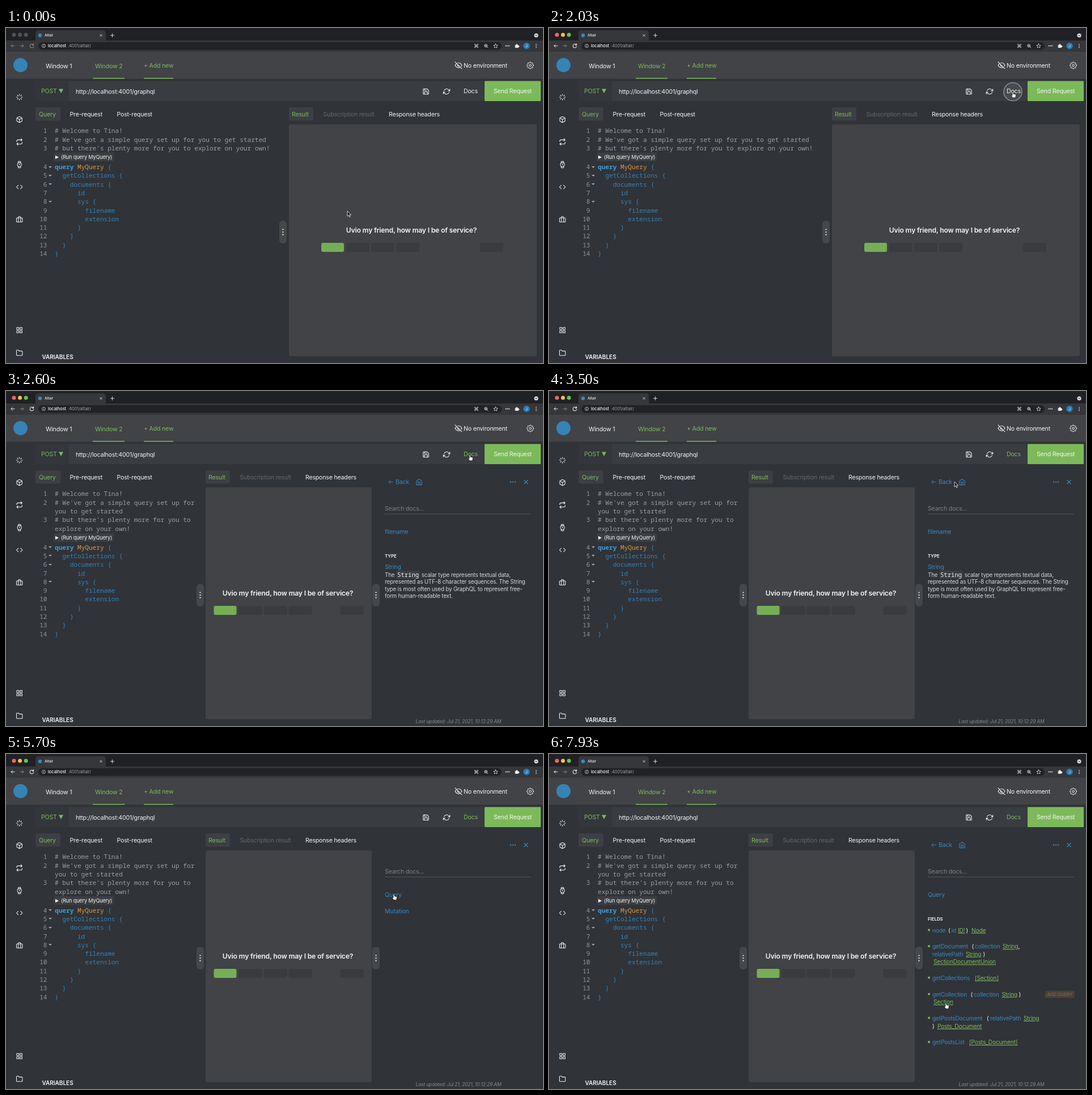
An HTML page for the animation above (8 s loop, 947 px wide and 591 px high).

```html
<!DOCTYPE html>
<html lang="en">
<head>
<meta charset="utf-8">
<title>GraphQL docs panel</title>
<style>
html, body { margin: 0; width: 100%; height: 100%; overflow: hidden; background: #303338; }
#stage { position: relative; width: 947px; height: 591px; overflow: hidden; }
svg { position: absolute; left: 0; top: 0; }
svg text { font-family: Inter, "Open Sans", sans-serif; white-space: pre; }
#editor { position: absolute; left: 86px; top: 173.4px; color: #3482b5;
  font: 11.1px/15.3px "Noto Sans Mono", "DejaVu Sans Mono", monospace; font-variant-ligatures: none; }
#editor .line { position: relative; white-space: pre-wrap; }
#editor .num { position: absolute; right: calc(100% + 13.5px); color: #92959a; }
#editor .fold::before { content: ""; position: absolute; left: -11px; top: 6.5px;
  border: 3px solid transparent; border-top: 3.5px solid #a3a6a9; }
#editor .note { color: #9b9ea1; }
#editor b { color: #459bd0; }
#editor i { color: #dc9647; font-style: normal; font-weight: 500; }
#editor .run { height: 17.8px; white-space: nowrap; }
#editor .run span { display: inline-block; height: 15px; margin: 1px 0 0 -2px; padding: 0 3px; border-radius: 2px;
  background: #3b3e42; color: #f0f0f0; font: 9.2px/15px Inter, sans-serif; letter-spacing: -.2px; }
#editor .run span::before { content: ""; display: inline-block; margin-right: 4px;
  border: 3.3px solid transparent; border-left: 6.5px solid #fff; border-right: 0; }
#desc { position: absolute; top: 318px; color: #d5d7d9; font: 9.9px/12.3px Inter, sans-serif; letter-spacing: -.2px; }
#desc code { font: 500 10.6px/12px "Noto Sans Mono", "DejaVu Sans Mono", monospace; letter-spacing: 0;
  padding: 0 2px; background: #3b3e42; color: #f0f0f0; border-radius: 2px; }
</style>
</head>
<body>
<div id="stage">
  <svg id="base" width="947" height="591"></svg>
  <div id="editor"></div>
  <div id="desc">The <code>String</code> scalar type represents textual data, represented as UTF-8 character sequences. The String type is most often used by GraphQL to represent free-form human-readable text.</div>
  <svg id="top" width="947" height="591"></svg>
</div>
<script>
const LOOP = 8000;
const GREEN = '#7cba59', BLUE = '#3688c0', WHITE = '#f3f4f5', BG = '#303338', LIGHT = '#414347';
const $ = id => document.getElementById(id);
const clamp = v => Math.max(0, Math.min(1, v));
const lerp = (a, b, p) => a + (b - a) * p;
const ramp = (t, from, to) => clamp((t - from) / (to - from));
const smooth = p => p * p * (3 - 2 * p);

function el(parent, tag, attrs = {}) {
  const node = document.createElementNS('http://www.w3.org/2000/svg', tag);
  for (const key in attrs) node.setAttribute(key, attrs[key]);
  return parent.appendChild(node);
}
const group = parent => el(parent, 'g');
const rect = (parent, x, y, width, height, fill, rx = 0) => el(parent, 'rect', { x, y, width, height, fill, rx });
const dot = (parent, cx, cy, r, fill) => el(parent, 'circle', { cx, cy, r, fill });
const stroke = (parent, d, color, width = 1) => el(parent, 'path', {
  d, fill: 'none', stroke: color, 'stroke-width': width, 'stroke-linecap': 'round', 'stroke-linejoin': 'round' });

// y is the middle of the capitals
function text(parent, x, y, str, fill = WHITE, size = 10.6, more = {}) {
  const node = el(parent, 'text', { x, y: y + size * .36, fill, 'font-size': size, 'letter-spacing': -.2, ...more });
  node.textContent = str;
  return node;
}
const shift = (node, x, y = 0) => node.setAttribute('transform', `translate(${x} ${y})`);
const show = (node, on) => node.style.display = on ? '' : 'none';

const ICONS = {
  loader: 'M12 2v4M12 18v4M4.9 4.9l2.9 2.9M16.2 16.2l2.9 2.9M2 12h4M18 12h4M4.9 19.1l2.9-2.9M16.2 7.8l2.9-2.9',
  box: 'M21 16V8a2 2 0 0 0-1-1.7l-7-4a2 2 0 0 0-2 0l-7 4A2 2 0 0 0 3 8v8a2 2 0 0 0 1 1.7l7 4a2 2 0 0 0 2 0l7-4A2 2 0 0 0 21 16zM3.3 7 12 12l8.7-5M12 22V12',
  repeat: 'M17 1l4 4-4 4M3 11V9a4 4 0 0 1 4-4h14M7 23l-4-4 4-4M21 13v2a4 4 0 0 1-4 4H3',
  watch: 'M19 12a7 7 0 1 0-14 0 7 7 0 1 0 14 0M12 9v3l1.5 1.5M16.5 17.3l-.4 3.8a2 2 0 0 1-2 1.9H9.8a2 2 0 0 1-2-1.9l-.3-3.8M7.5 6.7l.3-3.8A2 2 0 0 1 9.8 1h4.3a2 2 0 0 1 2 1.9l.4 3.8',
  code: 'M16 18l6-6-6-6M8 6l-6 6 6 6',
  bag: 'M4 7h16a2 2 0 0 1 2 2v10a2 2 0 0 1-2 2H4a2 2 0 0 1-2-2V9a2 2 0 0 1 2-2zM16 21V5a2 2 0 0 0-2-2h-4a2 2 0 0 0-2 2v16',
  grid: 'M3 3h7v7H3zM14 3h7v7h-7zM14 14h7v7h-7zM3 14h7v7H3z',
  folder: 'M22 19a2 2 0 0 1-2 2H4a2 2 0 0 1-2-2V5a2 2 0 0 1 2-2h5l2 3h9a2 2 0 0 1 2 2z',
  save: 'M19 21H5a2 2 0 0 1-2-2V5a2 2 0 0 1 2-2h11l5 5v11a2 2 0 0 1-2 2zM17 21v-8H7v8M7 3v5h8',
  refresh: 'M23 4v6h-6M1 20v-6h6M3.5 9a9 9 0 0 1 14.9-3.4L23 10M1 14l4.6 4.4A9 9 0 0 0 20.5 15',
  hidden: 'M17.9 17.9A10 10 0 0 1 12 20c-7 0-11-8-11-8a18.5 18.5 0 0 1 5-5.9M9.9 4.2A9 9 0 0 1 12 4c7 0 11 8 11 8a18.5 18.5 0 0 1-2.2 3.2M14.1 14.1a3 3 0 1 1-4.2-4.2M1 1l22 22',
  back: 'M20 12H4M11 19l-7-7 7-7',
  home: 'M3 9l9-7 9 7v11a2 2 0 0 1-2 2H5a2 2 0 0 1-2-2zM9 22V12h6v10',
  close: 'M18 6 6 18M6 6l12 12',
  zoom: 'M18 11a7 7 0 1 0-14 0 7 7 0 1 0 14 0M16 16l6 6M8 11h6M11 8v6',
  star: 'M12 2l3 7 7 .6-5.300 4.700 1.700 7.200L12 17.500 5.600 21.500l1.700-7.200L2 9.600 9 9z',
  cmd: 'M9 9h6v6H9zM9 9V6a3 3 0 1 0-3 3zM15 9V6a3 3 0 1 1 3 3zM15 15v3a3 3 0 1 0 3-3zM9 15v3a3 3 0 1 1-3-3z',
  puzzle: 'M4 8h5a3 3 0 1 1 5 0h5v5a3 3 0 1 1 0 4v4H4z'
};
function icon(parent, name, x, y, color = WHITE, size = 12.5, width = 2) {
  const k = size / 24;
  const node = stroke(parent, ICONS[name], color, width);
  node.setAttribute('transform', `translate(${x - size / 2} ${y - size / 2}) scale(${k})`);
  return node;
}
function gear(parent, x, y) {
  let d = '';
  for (let i = 0; i < 32; i++) {
    const r = i % 4 < 2 ? 6 : 4.7, a = (i - .5) * Math.PI / 16;
    d += (i ? 'L' : 'M') + (x + r * Math.cos(a)).toFixed(2) + ' ' + (y + r * Math.sin(a)).toFixed(2);
  }
  stroke(parent, d + 'z', WHITE);
  el(parent, 'circle', { cx: x, cy: y, r: 1.9, fill: 'none', stroke: WHITE });
}

const base = $('base'), top_ = $('top');

// browser frame
rect(base, 0, 0, 947, 591, BG);
rect(base, 0, 0, 947, 23, '#202124');
rect(base, 0, 22, 947, 20, '#35373a');
rect(base, 52, 4, 124, 22, '#35373a', 5);
rect(base, 57, 25, 817, 13.5, '#202225', 6.7);
const lights = ['#ed6a5e', '#f5bf4f', '#61c555'].map((color, i) => ({ color, node: dot(base, 14 + i * 10.6, 12, 3.5, color) }));
dot(base, 60, 13, 3.3, '#3d86b5');
text(base, 68, 13, 'Altair', '#e4e5e6', 6.4, { 'font-weight': 500 });
icon(base, 'close', 167.5, 13, '#dddddd', 7, 3);
stroke(base, 'M184.500 13h6M187.500 10v6', '#d8d9da');
dot(base, 935, 13, 3.6, '#d8d9da');
stroke(base, 'M933.500 12.500l1.500 1.500 1.500-1.500', '#202124', .9);
const backArrow = icon(base, 'back', 12, 31.5, '#e4e5e6', 9, 2.6);
el(icon(base, 'back', 0, 0, '#85888b', 9, 2.6), 'title').remove();
base.lastChild.setAttribute('transform', 'translate(32.5 27) scale(-.375 .375)');
const reload = stroke(base, 'M48.300 29.800a3.300 3.300 0 1 0 .4 2.500M48.600 27.800v2.300h-2.300', '#e4e5e6', 1.1);
el(base, 'circle', { cx: 66.5, cy: 31.5, r: 3, fill: 'none', stroke: '#c8cacc', 'stroke-width': .9 });
stroke(base, 'M66.500 31.200v1.700M66.500 29.700v.1', '#c8cacc', .9);
text(base, 74, 31.5, 'localhost', '#f2f2f2', 7.4, { 'font-weight': 500, 'letter-spacing': 0 });
text(base, 109, 31.5, ':4001/altair/', '#a2a5a8', 7.4, { 'letter-spacing': -.05 });
icon(base, 'cmd', 829.5, 31.5, '#d8d9da', 8.5, 2.3);
icon(base, 'zoom', 846.5, 31.5, '#d8d9da', 8.5, 2.6);
icon(base, 'star', 863.5, 31.5, '#d8d9da', 9, 2.3);
for (let i = -1; i < 2; i++) {
  dot(base, 884.5 + i * 2.8, 31.5, 1.1, '#d8d9da');
  dot(base, 935, 31.5 + i * 2.7, .85, '#d8d9da');
}
icon(base, 'puzzle', 901, 31.5, WHITE, 8, 2).setAttribute('fill', WHITE);
dot(base, 918, 31.5, 5.6, '#2780bd');
text(base, 916.3, 31.7, 'J', WHITE, 6.5);

// app header
rect(base, 0, 42, 947, 47.5, LIGHT);
dot(base, 25.5, 65.5, 12.5, '#3683b5');
text(base, 70, 67, 'Window 1');
text(base, 157, 67, 'Window 2', GREEN);
text(base, 243, 66.2, '+ Add new', GREEN);
rect(base, 153, 88, 56, 1.5, GREEN);
rect(base, 243, 88, 52, 1.5, GREEN);
icon(base, 'hidden', 798, 65.8, WHITE, 13);
text(base, 807, 65.8, 'No environment');
gear(base, 924.5, 66);

[['loader', 122], ['box', 161.5], ['repeat', 201], ['watch', 241], ['code', 280.5], ['bag', 337.5], ['grid', 533], ['folder', 573]]
  .forEach(([name, y]) => icon(base, name, 23.7, y));

// address row
rect(base, 52, 93.5, 792, 35.5, '#393c40', 2);
rect(base, 52, 93.5, 59, 35.5, '#33363b', 2);
text(base, 62, 111.5, 'POST', GREEN);
el(base, 'path', { d: 'M93 107.500h8l-4 7.500z', fill: GREEN });
text(base, 123, 112, 'http://localhost:4001/graphql');
icon(base, 'save', 740.5, 112);
icon(base, 'refresh', 777, 112);
const docsLabel = text(base, 807, 111.5, 'Docs');
rect(base, 844, 93.5, 99, 35.5, GREEN, 1);
text(base, 860, 111.5, 'Send Request');

rect(base, 52, 140, 44, 23.5, '#3c3f43', 3);
text(base, 58, 152, 'Query', GREEN);
text(base, 112.5, 152, 'Pre-request');
text(base, 195.5, 152, 'Post-request');
text(base, 63.5, 580, 'VARIABLES', WHITE, 10, { 'font-weight': 600, 'letter-spacing': 0 });

// result pane
const pane = rect(base, 499, 170, 437, 409, LIGHT, 3);
const tabs = group(base);
rect(tabs, 0, 140, 43, 23.5, '#3c3f43', 3);
text(tabs, 5, 152, 'Result', GREEN);
text(tabs, 60.5, 152, 'Subscription result', '#65686c');
text(tabs, 176, 152, 'Response headers');
const greeting = text(base, 0, 356.5, 'Uvio my friend, how may I be of service?', WHITE, 12.2, { 'font-weight': 600, 'text-anchor': 'middle' });
const bars = [0, 1, 2, 3, 4].map(i => rect(base, 0, 379, i ? 41 : 40, 16, i ? '#393b3e' : '#76ae56', 3));

function resizer() {
  const g = group(base);
  rect(g, -6.5, 340, 13, 40, '#45484b', 6);
  for (let i = 0; i < 3; i++) dot(g, 0, 355.5 + i * 4.6, 1.1, WHITE);
  return g;
}
const resizers = [resizer(), resizer()];

// docs panel
const docs = group(base), sliding = group(docs);
const nav = group(sliding);
icon(nav, 'back', 678.5, 160.5, BLUE, 11);
text(nav, 687, 160.5, 'Back', BLUE);
icon(nav, 'home', 728.5, 160.5, BLUE, 12.5);
text(sliding, 668, 207, 'Search docs...', '#7d8084');
for (let i = -1; i < 2; i++) dot(docs, 894 + i * 4, 160.5, 1.2, BLUE);
icon(docs, 'close', 917, 160.5, BLUE, 13);
const rule = rect(docs, 668, 216.5, 258, 1, '#53565a');
const updated = text(docs, 798, 583, 'Last updated: Jul 21, 2021, 10:12:29 AM', '#85888c', 8.5, { 'font-style': 'italic', 'text-anchor': 'middle' });
const label = (g, str) => text(g, 668, 291.5, str, '#e8e9ea', 7.8, { 'font-weight': 700, 'letter-spacing': 0 });

const typeView = group(sliding), homeView = group(sliding), fieldView = group(sliding);
text(typeView, 668, 248, 'filename', BLUE);
label(typeView, 'TYPE');
text(typeView, 668, 310.5, 'String', BLUE);
text(homeView, 668, 248, 'Query', BLUE);
text(homeView, 668, 277, 'Mutation', BLUE);
text(fieldView, 668, 248, 'Query', BLUE);
label(fieldView, 'FIELDS');

// tokens are [x, text]; "_" in front marks a type link
const FIELDS = [
  [311, 1, [676, 'node'], [704, '('], [709.5, 'id'], [721, '_ID!'], [735.5, ')'], [745, '_Node']],
  [339.5, 1, [676, 'getDocument'], [745.5, '('], [751, 'collection'], [800, '_String'], [827.5, ',']],
  [353, 0, [676, 'relativePath'], [735, '_String'], [765.5, ')']],
  [366.5, 0, [678, '_SectionDocumentUnion']],
  [395, 1, [676, 'getCollections'], [751, '_[Section]']],
  [424, 1, [676, 'getCollection'], [743.5, '('], [749, 'collection'], [798.5, '_String'], [828.5, ')']],
  [437.5, 0, [678, '_Section']],
  [466, 1, [676, 'getPostsDocument'], [772, '('], [778, 'relativePath'], [837, '_String']],
  [480, 0, [676, ')'], [685, '_Posts_Document']],
  [508.5, 1, [676, 'getPostsList'], [741, '_[Posts_Document]']]
];
for (const [y, first, ...tokens] of FIELDS) {
  if (first) dot(fieldView, 670, y - .5, 2, GREEN);
  for (const [x, str] of tokens) {
    const link = str[0] === '_';
    const color = link ? GREEN : /\w/.test(str) ? BLUE : WHITE;
    text(fieldView, x, y, link ? str.slice(1) : str, color, 10.2, link ? { 'text-decoration': 'underline' } : {});
  }
}
// [row, pointer enters, pointer leaves]
const hovers = [[339.5, 7430, 7530], [395, 7590, 7650], [424, 7740, LOOP]].map(([y, enter, leave]) => {
  const node = group(fieldView);
  rect(node, 874.5, y - 6.5, 52.5, 13, '#e0953f', 2).setAttribute('opacity', .3);
  text(node, 878, y, 'ADD QUERY', '#e0953f', 8, { 'font-style': 'italic', 'font-weight': 500 });
  return { node, enter, leave };
});

// query editor
const LINES = [
  '<span class="note"># Welcome to Tina!</span>',
  '<span class="note"># We\'ve got a simple query set up for you to get started</span>',
  '<span class="note"># but there\'s plenty more for you to explore on your own!</span>',
  '<b>query</b> <i>MyQuery</i> {', '  getCollections {', '    documents {', '      id', '      sys {',
  '        filename', '        extension', '      }', '    }', '  }', '}'
];
$('editor').innerHTML = LINES.map((line, i) =>
  (i === 3 ? '<div class="run"><span>(Run query MyQuery)</span></div>' : '') +
  `<div class="line${line.endsWith('{') ? ' fold' : ''}"><span class="num">${i + 1}</span>${line}</div>`).join('');

// pointer
const ring = el(top_, 'circle', { r: 16, fill: '#ffffff', 'fill-opacity': .08, stroke: '#8d9092', 'stroke-width': 1.5 });
const arrow = el(top_, 'path', { d: 'M0 0v9.200l2.100-2 1.500 3.300 1.500-.7-1.500-3.200h2.900z', fill: '#111', stroke: '#fff', 'stroke-width': .8 });
const hand = el(top_, 'path', {
  d: 'M-1 .8q1-1.400 2 0v3l3.500.8q1 .3.900 1.400l-.6 3.200-.8 1.200h-4l-2.800-3.400q-.4-1.200.6-1l1.200.8z',
  fill: '#fff', stroke: '#111', 'stroke-width': .7 });

const PATH = [[0, 602, 323], [900, 602, 323], [1600, 818, 112.5], [3270, 818, 112.5], [3500, 715, 160], [3750, 727, 161],
  [4680, 727, 161], [4900, 692.5, 235], [5200, 684, 247], [6550, 684, 247], [6730, 697.5, 295],
  [7300, 697.5, 295], [7850, 700, 439], [LOOP, 700, 439]];
const HAND = [[1520, 3290], [3620, 4700], [5080, 6570], [7740, LOOP]];
const CLICKS = [[1990, 2200], [4590, 4740], [6420, 6570]];
const within = (t, spans) => spans.some(([a, b]) => t >= a && t < b);

function pointerAt(t) {
  const i = PATH.findIndex(key => key[0] > t), a = PATH[i - 1], b = PATH[i];
  const p = smooth(ramp(t, a[0], b[0]));
  return [lerp(a[1], b[1], p), lerp(a[2], b[2], p)];
}

// the CSS "ease" curve
function ease(x) {
  let lo = 0, hi = 1;
  const bez = (u, a, b) => 3 * u * (1 - u) ** 2 * a + 3 * u * u * (1 - u) * b + u ** 3;
  for (let i = 0; i < 20; i++) {
    const mid = (lo + hi) / 2;
    if (bez(mid, .25, .25) < x) lo = mid; else hi = mid;
  }
  return x >= 1 ? 1 : bez(lo, .1, 1);
}

function layout(p) {
  const left = lerp(499, 352, p), right = lerp(936, 645, p), center = lerp(715, 497, p);
  const split = lerp(488.5, 342.5, p), docX = lerp(956, 668, p);
  pane.setAttribute('x', left);
  pane.setAttribute('width', right - left);
  shift(tabs, left);
  greeting.setAttribute('x', center);
  const row = Math.min(320, right - left - 30), start = center + 1 - row / 2;
  bars.forEach((bar, i) => bar.setAttribute('x', i < 4 ? start + i * 44 : start + row - 40));
  shift(resizers[0], split);
  shift(resizers[1], docX - 15.5);
  shift(sliding, docX - 668);
  rule.setAttribute('x', docX);
  rule.setAttribute('width', Math.max(0, 926 - docX));
  updated.setAttribute('x', (docX + 928) / 2);
  $('editor').style.width = split - 86 + 'px';
  $('desc').style.left = docX + 'px';
  $('desc').style.width = Math.max(0, 928 - docX) + 'px';
}

function draw(t) {
  const active = t >= 400, open = t >= 2270;
  const p = open ? ease(ramp(t, 2270, 2570)) : 0;
  layout(p);

  lights.forEach(({ node, color }) => node.setAttribute('fill', active ? color : '#505255'));
  backArrow.setAttribute('stroke', active ? '#e4e5e6' : '#85888b');
  reload.setAttribute('stroke', active ? '#e4e5e6' : '#85888b');
  docsLabel.setAttribute('fill', open ? GREEN : WHITE);

  const view = t < 4690 ? 'type' : t < 6520 ? 'home' : 'fields';
  show(docs, open);
  show(resizers[1], open);
  docs.setAttribute('opacity', ramp(t, 2290, 2490));
  show(nav, view !== 'home');
  show(typeView, view === 'type');
  show(homeView, view === 'home');
  show(fieldView, view === 'fields');
  show($('desc'), p > .5 && view === 'type');
  for (const { node, enter, leave } of hovers) {
    const peak = ramp(Math.min(t, leave), enter, enter + 400);
    node.setAttribute('opacity', Math.max(0, peak - Math.max(0, t - leave) / 400));
  }

  const [x, y] = pointerAt(t), isHand = within(t, HAND);
  shift(arrow, x, y);
  shift(hand, x, y);
  shift(ring, x, y);
  show(arrow, !isHand);
  show(hand, isHand);
  show(ring, within(t, CLICKS));
}

function tick() {
  draw(performance.now() % LOOP);
  requestAnimationFrame(tick);
}
tick();
</script>
</body>
</html>
```
